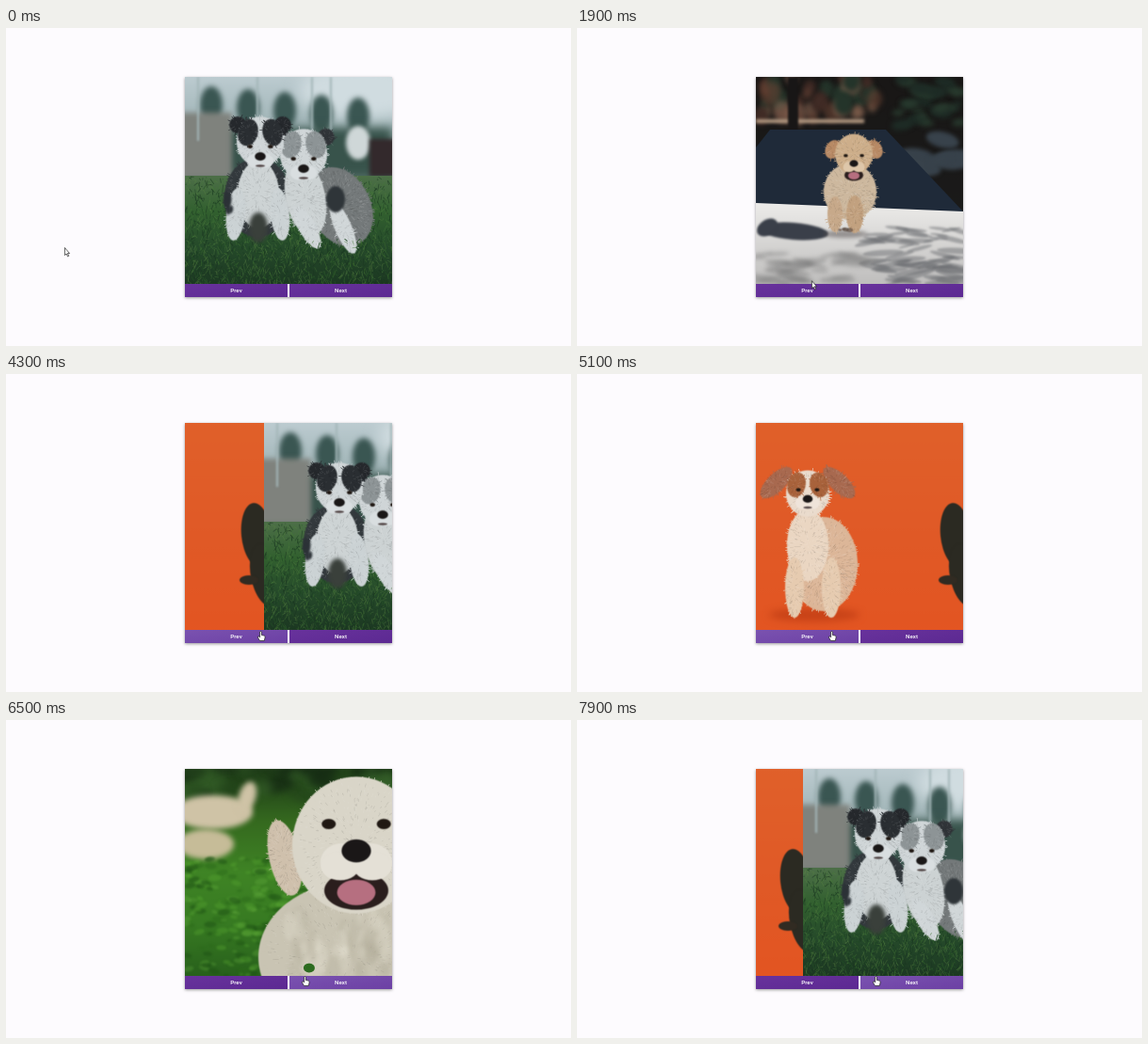
Write an HTML page with a canvas that moves like this. It is 600 px wide and 338 px high and loops after 8 s.

```html
<!DOCTYPE html>
<html lang="en">
<head>
<meta charset="utf-8">
<title>Puppy carousel</title>
<style>
html, body { margin: 0; width: 100%; height: 100%; overflow: hidden; background: #fdfbfe; }
#card { position: absolute; left: 190px; top: 52px; width: 220px; height: 233.5px; background: #fff; box-shadow: 0 1px 3px #0006; }
canvas { position: absolute; left: 0; top: 0; width: 220px; height: 220px; }
.btn { position: absolute; top: 220px; width: 109px; height: 13.5px; background: linear-gradient(170deg, #68329c, #5c2992);
  color: #fff; font: 500 6.2px/15px Roboto, sans-serif; text-align: center; }
.btn.hover { background: linear-gradient(170deg, #7a52b0, #6c40a4); }
#next { right: 0; }
svg { position: absolute; left: 0; top: 0; width: 12px; height: 14px; overflow: visible; }
</style>
</head>
<body>
<div id="card">
  <canvas id="view" width="440" height="440"></canvas>
  <div class="btn" id="prev">Prev</div>
  <div class="btn" id="next">Next</div>
</div>
<svg id="cursor" stroke="#222" stroke-width=".7" fill="#fff" stroke-linejoin="round">
  <path id="arrow" d="M.4 0V8L2.2 6.5 3.5 9.4 4.7 8.8 3.4 6H5.5Z"/>
  <path id="hand" d="M-.9.6Q0-.6.9.6V4L3.8 4.6Q4.8 5 4.6 6.5L3.8 10H-1L-3 6.6Q-3.3 5.2-2 5.4L-.9 6.4Z"/>
</svg>
<script>
const SIZE = 220, LOOP = 8000, SLIDE_MS = 500;
const $ = id => document.getElementById(id);

let seed = 7;
const rnd = () => (seed = seed * 16807 % 2147483647) / 2147483647;
const pick = list => list[Math.floor(rnd() * list.length)];

let g; // context of the photo being painted

function photo(draw) {
  const c = document.createElement('canvas');
  c.width = c.height = SIZE * 2;
  g = c.getContext('2d');
  g.scale(2, 2);
  draw();
  return c;
}

function dot(color, x, y, rx, ry, blur = .4, turn = 0) {
  g.filter = `blur(${blur * 2}px)`;
  g.fillStyle = color;
  g.beginPath(); g.ellipse(x, y, rx, ry, turn, 0, 7); g.fill();
  g.filter = 'none';
}

function rect(color, x, y, w, h, blur = 1) {
  g.filter = `blur(${blur * 2}px)`;
  g.fillStyle = color; g.fillRect(x, y, w, h);
  g.filter = 'none';
}

function fade(y, h, ...colors) {
  const f = g.createLinearGradient(0, y, 0, y + h);
  colors.forEach((color, i) => f.addColorStop(i / (colors.length - 1), color));
  g.fillStyle = f; g.fillRect(0, y, SIZE, h);
}

// Random dots with their centres in a box
function scatter(colors, n, x, y, w, h, rx, ry, blur = 1) {
  while (n--) {
    const s = .4 + rnd() * .8;
    dot(pick(colors), x + rnd() * w, y + rnd() * h, rx * s, ry * s, blur, (rnd() - .5) * .6);
  }
}

function stroke(color, x, y, dx, dy) {
  g.strokeStyle = color;
  g.beginPath(); g.moveTo(x, y); g.lineTo(x + dx, y + dy); g.stroke();
}

function grass(colors, n, y, h, len) {
  g.lineWidth = .8;
  while (n--) stroke(pick(colors), rnd() * SIZE, y + rnd() * h, (rnd() - .5) * len, len * rnd());
}

// Ellipse with fine hairs that run outwards and roughen its edge
function fur(color, x, y, rx, ry, turn = 0) {
  dot(color, x, y, rx, ry, .6, turn);
  g.save();
  g.translate(x, y); g.rotate(turn); g.lineWidth = .6;
  for (let n = Math.min(900, rx * ry / 2); n > 0; n--) {
    const a = rnd() * 7, d = Math.sqrt(rnd()), len = 1 + rnd() * 3;
    const px = Math.cos(a) * rx * d, py = Math.sin(a) * ry * d;
    stroke(d > .9 ? color : pick(['#ffffff22', '#0000001a']), px, py, Math.cos(a) * len, Math.sin(a) * len);
  }
  g.restore();
}

// Head in units of its radius; ear is [dx, dy, rx, ry, turn] and is mirrored
function head({ x, y, r, coat, ear, earColor, drop, muzzle, mark, grin }) {
  const pair = (paint, color, dx, dy, rx, ry, turn = 0) => [-1, 1].forEach(s =>
    paint(color, x + s * dx * r, y + dy * r, rx * r, ry * r, ...(paint === fur ? [] : [.4]), -s * turn));
  const spot = (color, dy, rx, ry, blur) => dot(color, x, y + dy * r, rx * r, ry * r, blur);
  pair(fur, earColor, ...ear);
  fur(coat, x, y, r, r * 1.07);
  if (mark) pair(fur, mark, .52, -.4, .42, .58, .25);
  pair(dot, muzzle, .22, drop + .18, .34, .3);
  pair(dot, '#201813', .43, drop - .42, .11, .08);
  if (grin) {
    spot('#2a1e1d', drop + .62, .5, .3);
    spot('#b66f80', drop + .65, .3, .2);
    pair(dot, muzzle, .25, drop + .24, .3, .22);
  } else spot('#544848', drop + .4, .2, .05);
  spot('#1a1717', drop, .23, .18);
}

const white = photo(() => {
  fade(0, SIZE, '#1d3818', '#35691f', '#3f8425', '#377a22', '#28601c');
  scatter(['#13261399', '#23451c99', '#36602a99'], 40, 0, -5, SIZE, 35, 18, 10, 4);
  dot('#cfc3a6', 30, 46, 42, 18, 3);
  dot('#cfc3a6', 66, 30, 9, 17, 3, .3);
  dot('#c6bc98', 22, 80, 30, 16, 3);
  scatter(['#54a32f66', '#2b6a1977', '#6db74544', '#1e521588'], 220, 0, 95, 130, 125, 6, 3);
  fur('#c9c4b3', 178, 200, 100, 80);
  scatter(['#e9e4d544', '#a9a39233'], 50, 110, 160, 110, 60, 6, 14, 2);
  head({ x: 182, y: 81, r: 68, coat: '#d9d5c8', ear: [1.12, .2, .24, .6, -.22], earColor: '#cfc0ac', drop: .09, muzzle: '#e4e0d6', grin: true });
  scatter(['#2d6c20'], 4, 129, 210, 8, 6, 6, 5, .3);
});

const corgi = photo(() => {
  fade(0, SIZE, '#e0602a', '#e05a27', '#e35522');
  dot('#c84318', 62, 204, 48, 7, 4);
  fur('#dcb698', 72, 150, 36, 50);
  fur('#ead6c2', 55, 130, 22, 38);
  fur('#e6cbb0', 41, 175, 10, 32);
  fur('#e6cbb0', 80, 175, 10, 32);
  head({ x: 55, y: 75, r: 23, coat: '#eadbcc', ear: [1.45, -.5, .42, .95, .8], earColor: '#a8694f', drop: .25, muzzle: '#efe4da', mark: '#a8623b' });
  // Dark sitter cut off by the right edge
  dot('#2b2a22', 212, 119, 16, 34, .4, -.1);
  dot('#2b2a22', 222, 162, 16, 34, .4, -.2);
  dot('#312b22', 204, 167, 10, 5);
});

const huskies = photo(() => {
  fade(0, 110, '#bccbd0', '#9db2b4', '#5a766e');
  dot('#d0dce0', 190, 15, 70, 30, 8);
  for (let i = 0; i < 5; i++) dot('#3a5652', 28 + i * 39, 30 + i * 3, 12, 20, 3);
  rect('#38534b', 0, 54, SIZE, 52, 5);
  rect('#7f827d', -8, 38, 58, 70, 3);
  for (const x of [13, 76, 134, 154]) rect('#a3b6b8', x, 0, 2, 68);
  dot('#cfd7d8', 184, 70, 13, 18, 2);
  rect('#33292c', 196, 66, 30, 40, 2);
  fade(105, 115, '#4d6f48', '#32602f', '#25492a', '#1c3822');
  grass(['#5f8b4655', '#1b3c2288', '#467b3966', '#1a352299'], 2000, 105, 115, 8);

  fur('#33393d', 77, 128, 35, 42);
  fur('#cdd3d4', 78, 125, 22, 36);
  fur('#cbd2d4', 54, 146, 10, 28, .1);
  fur('#cbd2d4', 101, 146, 10, 28, -.1);
  scatter(['#2c3237'], 5, 43, 125, 8, 18, 5, 9);
  dot('#3a403b', 78, 160, 10, 16, 2);

  fur('#74797a', 165, 138, 32, 44, -.45);
  fur('#ccd2d3', 128, 128, 21, 42, -.2);
  fur('#d0d6d8', 168, 160, 9, 30, -.4);
  fur('#d0d6d8', 130, 160, 9, 25, -.5);
  dot('#2f3539', 160, 130, 10, 14, 1);

  const face = { r: 25, coat: '#cfd5d7', ear: [.95, -.72, .36, .36], drop: .62, muzzle: '#d9dee0' };
  head({ ...face, x: 126, y: 82, earColor: '#303438', mark: '#8d9496' });
  head({ ...face, x: 80, y: 69, earColor: '#25282c', mark: '#2a2e32' });
  grass(['#3f713188', '#234a26', '#4f784077'], 450, 172, 48, 9);
});

const runner = photo(() => {
  fade(0, SIZE, '#191716', '#1b1c1c');
  scatter(['#68433599', '#402b25', '#97705a88', '#24342a'], 40, 0, 0, 145, 45, 9, 11, 3);
  scatter(['#1e2c26', '#283a2e'], 30, 145, 0, 75, 55, 10, 5, 3);
  rect('#b89d85', 0, 45, 115, 4, 1.5);
  rect('#181616', 34, 0, 11, 60);
  scatter(['#38424b'], 7, 165, 65, 55, 38, 19, 9, 2);
  // Shaded road, then the sunlit pavement
  g.fillStyle = '#1f2a39';
  g.fill(new Path2D('M0 75 15 56H138L220 143V150H0Z'));
  const sun = g.createLinearGradient(0, 135, 0, SIZE);
  sun.addColorStop(0, '#ecebe9'); sun.addColorStop(1, '#bfbebd');
  g.fillStyle = sun;
  g.fill(new Path2D('M0 134 220 143V220H0Z'));
  scatter(['#66686b77'], 55, 125, 160, 95, 60, 20, 3);
  scatter(['#77777766'], 28, 0, 188, 110, 32, 22, 4, 2);
  dot('#3a3f49', 40, 164, 37, 9, 1, .08);
  dot('#3a3f49', 12, 160, 12, 8, 1, -.6);
  dot('#55504f88', 95, 167, 24, 4, 2);
  fur('#cdb89e', 100, 122, 28, 30);
  fur('#c7a98a', 84, 146, 8, 19);
  fur('#c2a17f', 105, 146, 9, 20);
  scatter(['#54423899'], 4, 80, 161, 27, 4, 5, 3, .5);
  head({ x: 104, y: 82, r: 20, coat: '#cdae8a', ear: [1.1, -.25, .4, .52, .5], earColor: '#b88a65', drop: .5, muzzle: '#dec7aa', grin: true });
});

const photos = [white, corgi, huskies, runner];
// [start time, photo to slide to]
const slides = [[1200, 3], [3150, 2], [4182, 1], [5100, 0], [6993, 1], [7665, 2]];
// [time, x, y] of the pointer tip
const track = [[1000, 62, 233.5], [1850, 248, 268.5], [2250, 270.5, 273.5], [6000, 270.5, 273.5], [6500, 317.5, 272.5]];

const bezier = (u, a, b) => 3 * u * (1 - u) ** 2 * a + 3 * u * u * (1 - u) * b + u ** 3;
const clamp = x => Math.max(0, Math.min(1, x));

// The standard CSS ease curve
function ease(x) {
  if (x <= 0 || x >= 1) return clamp(x);
  let lo = 0, hi = 1;
  for (let i = 0; i < 20; i++) {
    const m = (lo + hi) / 2;
    if (bezier(m, .25, .25) < x) lo = m; else hi = m;
  }
  return bezier(lo, .1, 1);
}

function pointer(t) {
  let [start, x, y] = track[0];
  for (const [end, toX, toY] of track.slice(1)) {
    const u = clamp((t - start) / (end - start)), s = u * u * (3 - 2 * u);
    x += (toX - x) * s;
    y += (toY - y) * s;
    start = end;
  }
  return [x, y];
}

const view = $('view').getContext('2d');
function frame(now) {
  const t = now % LOOP;
  let pos = 2;
  for (const [start, to] of slides) pos += (to - pos) * ease((t - start) / SLIDE_MS);
  photos.forEach((p, i) => view.drawImage(p, Math.round((i - pos) * SIZE) * 2, 0));

  const [x, y] = pointer(t), over = y > 272;
  $('cursor').style.transform = `translate(${x}px, ${y}px)`;
  $('arrow').style.display = over ? 'none' : '';
  $('hand').style.display = over ? '' : 'none';
  $('prev').classList.toggle('hover', over && x < 299);
  $('next').classList.toggle('hover', over && x > 301);
  requestAnimationFrame(frame);
}
requestAnimationFrame(frame);
</script>
</body>
</html>
```
